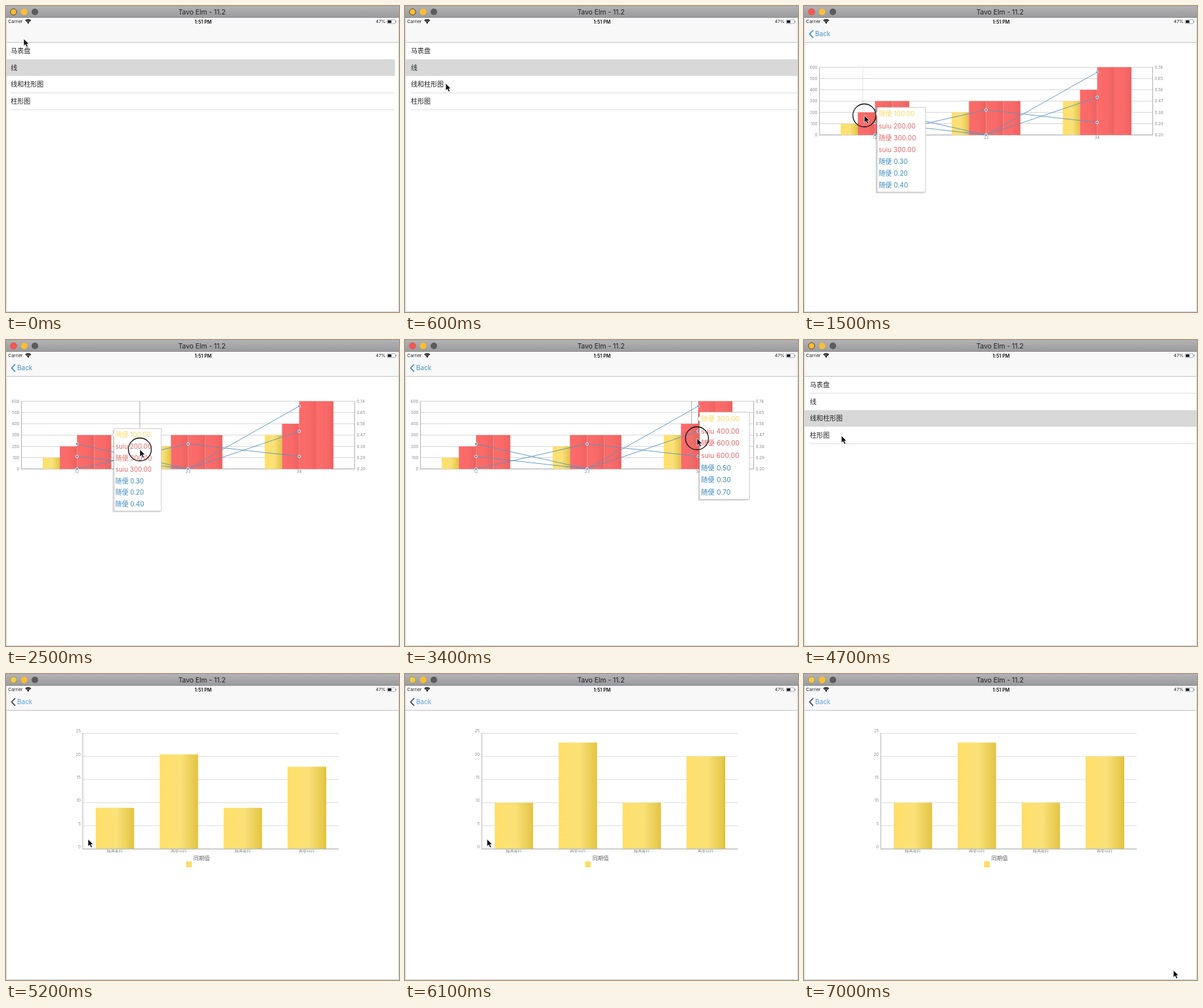
An HTML page that plays this animation: 599 px wide and 467 px high, repeating every 7.1 s.

```html
<!DOCTYPE html>
<html lang="zh-CN">
<head>
<meta charset="utf-8">
<title>Charts demo</title>
<style>
  html, body { margin: 0; width: 100%; height: 100%; overflow: hidden; background: #fff; }
  svg { display: block; font-family: Inter, "Noto Sans CJK SC", "Noto Sans CJK", sans-serif; }
</style>
</head>
<body>
<svg id="stage" width="599" height="467" viewBox="0 0 599 467">
  <defs>
    <linearGradient id="chrome" x2="0" y2="1">
      <stop stop-color="#b3b2b4"/><stop offset="1" stop-color="#9b9a9c"/>
    </linearGradient>
    <linearGradient id="gold">
      <stop stop-color="#ffdf6a"/><stop offset=".55" stop-color="#fae178"/><stop offset="1" stop-color="#e2c443"/>
    </linearGradient>
    <linearGradient id="coral">
      <stop stop-color="#fb6c6b"/><stop offset=".6" stop-color="#f86967"/><stop offset="1" stop-color="#ec6160"/>
    </linearGradient>
    <clipPath id="labelClip"><rect x="117" y="262" width="391" height="10.8"/></clipPath>
  </defs>
</svg>
<script>
const W = 599, H = 467, LOOP = 7100, STEP = 100;
const stage = document.getElementById('stage');

function add(parent, tag, attrs = {}, text) {
  const el = document.createElementNS('http://www.w3.org/2000/svg', tag);
  set(el, attrs);
  if (text !== undefined) el.textContent = text;
  parent.appendChild(el);
  return el;
}
function set(el, attrs) {
  for (const k in attrs) el.setAttribute(k, attrs[k]);
}
const group = (parent, attrs) => add(parent, 'g', attrs);
const rect = (p, x, y, width, height, fill, more) =>
  add(p, 'rect', { x, y, width, height, fill, ...more });
const line = (p, x1, y1, x2, y2, stroke, width = 1) =>
  add(p, 'line', { x1, y1, x2, y2, stroke, 'stroke-width': width });
// Text is placed by its vertical middle.
const label = (p, x, mid, size, fill, text, anchor = 'start', more) =>
  add(p, 'text', { x, y: mid + size * 0.36, 'font-size': size, fill, 'text-anchor': anchor, ...more }, text);
const show = (el, on) => { el.style.display = on ? '' : 'none'; };
const move = (el, x, y = 0) => el.setAttribute('transform', `translate(${x} ${y})`);

// ---- motion ----
const OPEN_COMBO = 700, PRESS = 1400, RELEASE = 3700, GO_BACK = 4100, OPEN_BARS = 4800;

const clamp = u => Math.max(0, Math.min(1, u));
const easeOut = (u, power) => 1 - (1 - clamp(u)) ** power;
const smooth = u => (u = clamp(u), u * u * (3 - 2 * u));

// Left side of the pushed page; the loop opens on the tail of a pop.
const slide = t => easeOut(t / 400, 3.3);
const pageX = t => W * (slide(t + 300) - slide(t - OPEN_COMBO) + slide(t - GO_BACK) - slide(t - OPEN_BARS));
const growth = t => easeOut(t / 600, 2);

// Each pointer move: leave, arrive, x, y.
const MOVES = [
  [200, 500, 62, 118], [900, 1500, 92, 167], [1700, 2400, 204, 167], [2500, 3400, 445, 150],
  [RELEASE, 4000, 28, 44], [4300, 4600, 57, 146], [4850, 5150, 125, 252], [6300, 6800, 563, 452]
];
function mouse(t) {
  let x = 27, y = 50;
  for (const [from, to, nx, ny] of MOVES) {
    const k = smooth((t - from) / (to - from));
    x += (nx - x) * k;
    y += (ny - y) * k;
  }
  return { x, y };
}

// ---- list page ----
rect(stage, 0, 0, W, H, '#fff');
const list = group(stage);
const TOP = 55.5, ROW = 25.7;
const mark = rect(list, 0, 0, W, ROW - .4, '#d8d8d8');
const rules = ['马表盘', '线', '线和柱形图', '柱形图'].map((text, i) => {
  const y = TOP + ROW * i;
  label(list, 9, y + 12.7, 10, '#222', text);
  return line(list, 9, y + ROW, W, y + ROW, '#dcdcdc');
});

// ---- pushed pages ----
const page = group(stage);
rect(page, 0, 56, W, H - 56, '#fff');
const combo = group(page), bars = group(page);

// Combined bar and line chart
const GREY = '#8c8c8c', GRID = '#d4d4d4', AXIS = '#b0b0b0', BLUE = '#5795c2';
const BASE = 196.8, TALL = 103.4, BAR_W = 26.15;
const columns = [[100, 200, 300, 300], [200, 300, 300, 300], [300, 400, 600, 600]];
const series = [[.3, .2, .5], [.2, .4, .3], [.4, .2, .7]];
const centre = i => 108.2 + 169.3 * i;
const barY = v => BASE - TALL * v / 600;
const lineY = v => BASE - TALL * (v - .2) / .54;

for (let i = 0; i <= 6; i++) {
  const y = BASE - TALL * i / 6;
  line(combo, 23, y, 532, y, GRID);
  label(combo, 20.5, y, 6.2, GREY, i * 100, 'end');
  label(combo, 534.5, y, 6.2, GREY, (.2 + .09 * i).toFixed(2));
}
line(combo, 23.5, 93, 23.5, BASE, AXIS);
line(combo, 531.5, 93, 531.5, BASE, AXIS);
line(combo, 23, BASE, 532, BASE, AXIS);

const slots = columns.flatMap((vals, c) => {
  label(combo, centre(c), 201, 6.2, GREY, 12 + 11 * c, 'middle');
  return vals.map((v, i) => {
    const x = centre(c) + (i - 2) * BAR_W;
    return { x, v, c, el: rect(combo, x, BASE, BAR_W, 0, i ? 'url(#coral)' : 'url(#gold)') };
  });
});
const guide = line(combo, 0, 93, 0, BASE, '#999', .8);
const curves = series.map(() => add(combo, 'polyline', { fill: 'none', stroke: BLUE, 'stroke-width': .9 }));
const dots = series.map(s => s.map((v, i) =>
  add(combo, 'circle', { cx: centre(i), r: 2, fill: BLUE, stroke: '#fff', 'stroke-width': .8 })));

const tip = group(combo);
add(tip, 'path', { d: 'M-38 -62V65H35', fill: 'none', stroke: '#000', 'stroke-opacity': .18, 'stroke-width': 1.6 });
add(tip, 'path', {
  d: 'M-36.5 -64H36.5V64H-36.5V-50L-39.5 -54L-36.5 -58Z',
  fill: '#fff', stroke: '#bcbcbc', 'stroke-width': .8
});
const TIP_NAMES = ['随便', 'suiu', '随便', 'suiu', '随便', '随便', '随便'];
const tipRows = TIP_NAMES.map((n, i) =>
  label(tip, -34.5, -54 + 17.9 * i, 10, i === 0 ? '#fbd968' : i < 4 ? '#df6966' : '#3d8abb', n));

// Bar chart
const FLOOR = 267, UNIT = 7.06;
for (let i = 0; i <= 5; i++) {
  const y = FLOOR - UNIT * 5 * i;
  line(bars, 117, y, 507, y, '#dcdcdc');
  label(bars, 114, y - 3.3, 6.2, GREY, i * 5, 'end');
}
const barVals = [10, 23, 10, 20];
const labels = group(bars, { 'clip-path': 'url(#labelClip)' });
const goldBars = barVals.map((v, i) => {
  const x = 136.8 + 97.45 * i;
  label(labels, x + 29.2, 271, 6, '#808080', i % 2 ? '西安分行' : '陕西省行', 'middle');
  return rect(bars, x, FLOOR, 58.5, 0, 'url(#gold)');
});
const edge = rect(bars, 486.3, FLOOR, 1.6, 0, '#e6bd22');
line(bars, 117, 90, 117, FLOOR, AXIS);
line(bars, 117, FLOOR, 507, FLOOR, AXIS);
rect(bars, 274.5, 286, 8.8, 9, '#fddd68');
label(bars, 285.7, 281, 8.3, '#666', '同期值');

// ---- navigation, status and window bars ----
rect(stage, 0, 17, W, 38.5, '#f8f8f8');
line(stage, 0, 55.5, W, 55.5, '#c4c4c4');
const back = group(stage);
const chevron = add(back, 'path', { d: 'M14 37L8.5 42.7L14 48.4', fill: 'none', 'stroke-width': 1.7 });
const backText = label(back, 17, 42.8, 10, '#4b93cf', 'Back');

label(stage, 3.2, 24, 6.8, '#222', 'Carrier');
for (const r of [2, 4, 6]) {
  const d = r * .7;
  add(stage, 'path', {
    d: `M${33.8 - d} ${26.6 - d}A${r} ${r} 0 0 1 ${33.8 + d} ${26.6 - d}`,
    fill: 'none', stroke: '#111', 'stroke-width': 1.4
  });
}
add(stage, 'circle', { cx: 33.8, cy: 26, r: .9, fill: '#111' });
label(stage, 300.5, 24, 7.2, '#111', '1:51 PM', 'middle', { 'font-weight': 600 });
label(stage, 578.5, 24, 6.8, '#222', '47%', 'end');
rect(stage, 581, 21, 12.4, 5.8, '#fff', { rx: 1, stroke: '#888', 'stroke-width': .7 });
rect(stage, 582, 22, 5.4, 3.8, '#10102c');
rect(stage, 594.2, 22.8, 1, 2.2, '#888');

rect(stage, 0, 0, W, 17.5, 'url(#chrome)');
line(stage, 0, 17.5, W, 17.5, '#8c8b8d');
const light = add(stage, 'circle', { cx: 11.5, cy: 9, r: 4.8, 'stroke-width': .9 });
add(stage, 'circle', { cx: 27.7, cy: 9, r: 5, fill: '#fdbd2f' });
add(stage, 'circle', { cx: 44, cy: 9, r: 5, fill: '#5b5a5c' });
label(stage, 298.7, 9, 10.3, '#222', 'Tavo Elm - 11.2', 'middle');
add(stage, 'path', { d: 'M.5 18V466.5H598.5V18', fill: 'none', stroke: '#d6d6d6' });

// ---- pointer ----
const pointer = group(stage);
const ring = add(pointer, 'circle', { r: 17.5, fill: 'none', stroke: '#111', 'stroke-width': 1.3 });
add(pointer, 'path', {
  d: 'M0 0V11.2L2.6 8.8L4.4 13L6.5 12.1L4.7 8H8Z',
  fill: '#0a0a14', stroke: '#fff', 'stroke-width': .7
});

// ---- drawing ----
function grow(el, top, base, k) {
  const h = (base - top) * k;
  set(el, { y: base - h, height: h });
}

// The guide trails the pointer by one step and stays put after release.
const guideX = t => mouse(Math.min(t, RELEASE) - STEP).x;
const slotAt = t => t >= PRESS && slots.findLast(s => s.x <= guideX(t));

function drawTip(t) {
  const slot = slotAt(t);
  show(tip, slot);
  show(guide, slot);
  if (!slot) return;

  const x = guideX(t);
  set(guide, { x1: x, x2: x, 'stroke-opacity': clamp(.35 + (t - PRESS - STEP) / 400) });

  // The box pops when it jumps to another bar.
  let age = 0;
  while (slotAt(t - (age + 1) * STEP) === slot) age++;
  const scale = .98 + .06 / 2 ** age;
  const y = 198 + (barY(slot.v) - barY(300)) * 1.24;
  set(tip, { transform: `translate(${slot.x + BAR_W + 40.3} ${y}) scale(${scale})` });

  const vals = [...columns[slot.c], ...series.map(s => s[slot.c])];
  tipRows.forEach((el, i) => { el.textContent = TIP_NAMES[i] + ' ' + vals[i].toFixed(2); });
}

function drawCombo(t) {
  const k = growth(t - OPEN_COMBO);
  slots.forEach(s => grow(s.el, barY(s.v), BASE, k));
  series.forEach((s, n) => {
    const ys = s.map(v => BASE + (lineY(v) - BASE) * k);
    set(curves[n], { points: ys.map((y, i) => `${centre(i)},${y}`).join(' ') });
    ys.forEach((y, i) => set(dots[n][i], { cy: y }));
  });
  drawTip(t);
}

function drawBars(t) {
  const k = growth(t - OPEN_BARS);
  goldBars.forEach((el, i) => grow(el, FLOOR - UNIT * barVals[i], FLOOR, k));
  grow(edge, FLOOR - UNIT * barVals[3], FLOOR, k);
}

function render(t) {
  const px = pageX(t);
  const isBars = t >= OPEN_BARS, isCombo = t >= OPEN_COMBO && !isBars;
  const picked = isBars ? 3 : isCombo ? 2 : 1;

  move(list, -.3 * (W - px));
  set(mark, { y: TOP + ROW * picked + .2 });
  rules.forEach((r, i) => show(r, i !== picked && i !== picked - 1));
  move(page, px);
  show(combo, isCombo);
  show(bars, isBars);
  if (isCombo) drawCombo(t);
  if (isBars) drawBars(t);

  set(back, { opacity: picked === 1 ? 0 : 1 - px / W });
  set(chevron, { stroke: isBars ? '#3f4a58' : '#3f8fca' });
  set(backText, { fill: isBars ? '#5f9fe0' : '#4a92c6' });
  const [fill, stroke] = isBars ? ['#f3cb4a', '#a8934a']
    : isCombo && px < W / 2 ? ['#f9564f', '#e04a44'] : ['#fdbd2f', '#4a3f20'];
  set(light, { fill, stroke });

  const m = mouse(t);
  move(pointer, m.x, m.y);
  show(ring, t >= PRESS && t < RELEASE);
}

const start = performance.now();
function tick() {
  const t = (performance.now() - start) % LOOP;
  render(Math.floor(t / STEP) * STEP);
  requestAnimationFrame(tick);
}
tick();
</script>
</body>
</html>
```
